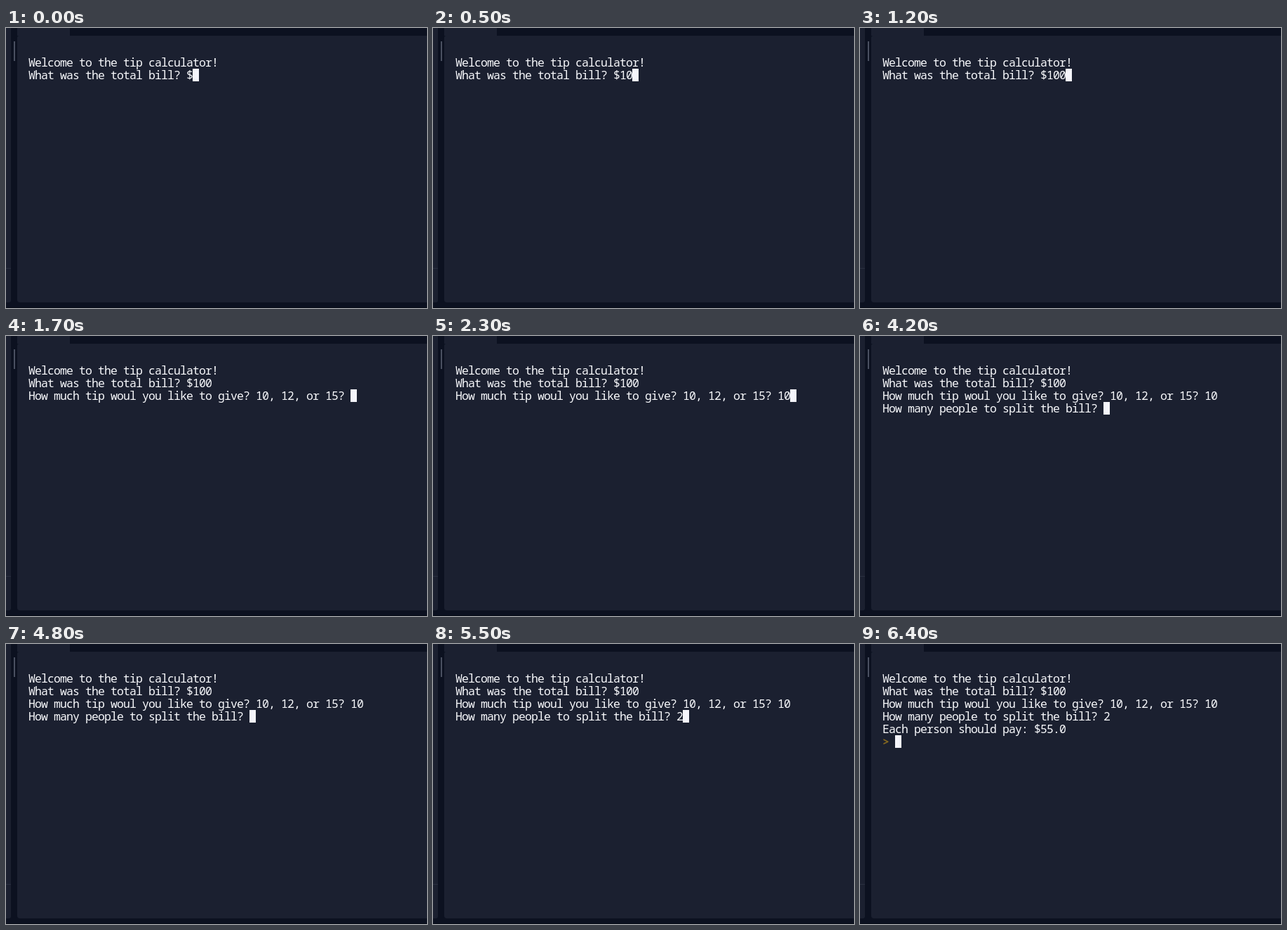
An HTML page for the animation above (6500 ms loop, 600 by 399 pixels).

```html
<!DOCTYPE html>
<html lang="en">
<head>
<meta charset="utf-8">
<title>Tip calculator</title>
<style>
  html, body { margin: 0; width: 100%; height: 100%; overflow: hidden; background: #0c1120; }
  .stage { position: relative; width: 600px; height: 399px; overflow: hidden; background: #0c1120; }
  .stage > div { position: absolute; }
  .side { left: 0; top: 0; width: 7px; height: 391px; background: #1b2030; border-radius: 0 0 3px 0; }
  .rule { left: 0; top: 342px; width: 7px; height: 1px; background: #2a3040; }
  .grip { left: 11px; top: 19px; width: 2px; height: 28px; background: #4a5060; }
  .tab { left: 16px; top: 0; width: 75px; height: 11px; background: #1b2030; }
  .panel { left: 16px; top: 11px; width: 584px; height: 380px; background: #1b2030; border-radius: 3px 0 0 4px; }
  .edge { left: 0; top: 398px; width: 600px; height: 1px; background: #070b16; }
  .stage > .term {
    left: 32px; top: 40px; white-space: pre; color: #f8f9fc;
    font: 500 16.5px/18px "Noto Sans Mono", "DejaVu Sans Mono", monospace;
    font-stretch: semi-condensed;
    letter-spacing: calc(9px - 1ch);
  }
  .term div { height: 18px; }
  .term .prompt { color: #86691f; font-weight: 700; }
  .cursor { position: absolute; left: 0; top: 0; width: 9px; height: 18px; background: #f5f5fb; }
</style>
</head>
<body>
<div class="stage">
  <div class="side"></div>
  <div class="rule"></div>
  <div class="grip"></div>
  <div class="tab"></div>
  <div class="panel"></div>
  <div class="edge"></div>
  <div class="term" id="term"></div>
</div>
<script>
  const LOOP = 6500, CELL = 9, ROW = 18;

  // [time in ms, text printed or typed at that time]
  const script = [
    [0, "Welcome to the tip calculator!\nWhat was the total bill? $"],
    [200, "1"], [400, "0"], [600, "0"],
    [1300, "\nHow much tip woul you like to give? 10, 12, or 15? "],
    [2000, "1"], [2200, "0"],
    [2900, "\nHow many people to split the bill? "],
    [5200, "2"],
    [5900, "\nEach person should pay: $55.0\n> "]
  ];

  const term = document.getElementById("term");
  let shown = null;

  function render(text) {
    const lines = text.split("\n");
    term.replaceChildren(...lines.map(line => {
      const row = document.createElement("div");
      row.textContent = line;
      if (line.startsWith(">")) row.className = "prompt";
      return row;
    }));
    const cursor = document.createElement("span");
    cursor.className = "cursor";
    const column = lines[lines.length - 1].length;
    cursor.style.transform = `translate(${column * CELL}px, ${(lines.length - 1) * ROW}px)`;
    term.append(cursor);
  }

  function tick() {
    const t = performance.now() % LOOP;
    const text = script.filter(([at]) => at <= t).map(([, s]) => s).join("");
    if (text !== shown) render(shown = text);
    requestAnimationFrame(tick);
  }
  tick();
</script>
</body>
</html>
```
